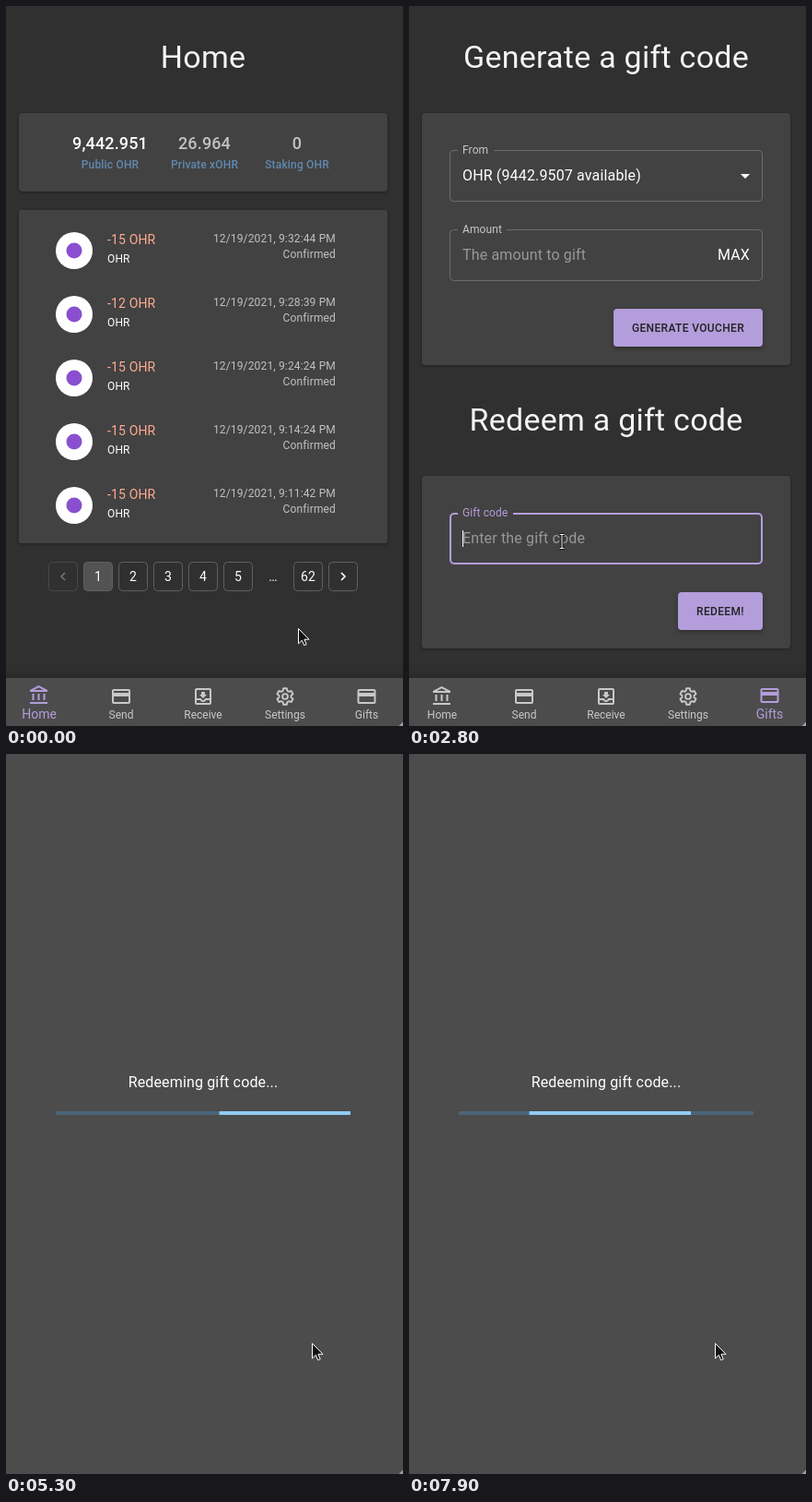
Write an HTML page that moves like this. It is 431 px wide and 780 px high and loops after 8 s.

```html
<!DOCTYPE html>
<html lang="en">
<head>
<meta charset="utf-8">
<title>Gift code wallet</title>
<style>
  html, body { margin: 0; width: 100%; height: 100%; overflow: hidden; background: #303030; }
  svg { display: block; width: 431px; height: 780px; }
  text { font: 400 16px Roboto, sans-serif; letter-spacing: .15px; fill: #fff; white-space: pre; }
  .title { font-size: 34px; letter-spacing: .25px; fill: #f4f4f4; }
  .total { font-size: 18px; font-weight: 500; letter-spacing: .135px; }
  .unit { font-size: 12px; font-weight: 500; letter-spacing: .17px; fill: #6189b0; }
  .sum { font-size: 14px; fill: #ffab91; }
  .small { font-size: 12px; }
  .dim { fill: #c2c2c2; }
  .label { font-size: 12px; letter-spacing: .11px; fill: #c6c6c6; }
  .page { font-size: 14px; }
  .hint { fill: #989898; }
  .btn { font-size: 12px; font-weight: 500; letter-spacing: .343px; fill: #212121; }
  .tab { letter-spacing: 0; }
  .card { fill: #424242; filter: drop-shadow(0 1px 1.5px rgba(0,0,0,.35)); }
  .box { fill: none; stroke: #6d6d6d; }
  .button { fill: #b39ddb; filter: drop-shadow(0 2px 2px rgba(0,0,0,.3)); }
  .bar { fill: #4c4c4c; filter: drop-shadow(0 1px 7px rgba(0,0,0,.35)); }
  .arrow { fill: #111; stroke: #fff; stroke-linejoin: round; }
  .hand { fill: #fff; stroke: #111; stroke-linejoin: round; }
</style>
</head>
<body>
<svg id="stage" viewBox="0 0 431 780" xmlns="http://www.w3.org/2000/svg"></svg>
<script>
const LOOP = 8000, STEP = 100;
const LILAC = [179, 157, 219], GREY = [200, 200, 200];
const COIN = "OHR";

// Markup helpers
const text = (x, y, str, cls = "", anchor = "start", more = "") =>
  `<text x="${x}" y="${y}" class="${cls}" text-anchor="${anchor}" ${more}>${str}</text>`;
const mid = (x, y, str, cls, more) => text(x, y, str, cls, "middle", more);
const rect = (x, y, w, h, cls, r = 4, more = "") =>
  `<rect x="${x}" y="${y}" width="${w}" height="${h}" rx="${r}" class="${cls}" ${more}/>`;

function gear() {
  const pts = [];
  for (let k = 0; k < 6; k++)
    for (const [r, off] of [[6.6, -21], [9, -12], [9, 12], [6.6, 21]]) {
      const a = (k * 60 - 90 + off) * Math.PI / 180;
      pts.push((12 + r * Math.cos(a)).toFixed(2) + " " + (12 + r * Math.sin(a)).toFixed(2));
    }
  return `<g fill="none" stroke="currentColor" stroke-width="1.9" stroke-linejoin="round">
    <path d="M${pts.join("L")}Z"/><circle cx="12" cy="12" r="2.9"/></g>`;
}

const outline = d => `<path fill="currentColor" fill-rule="evenodd" d="${d}"/>`;
const cardIcon = outline("M4 4H20a2 2 0 0 1 2 2V18a2 2 0 0 1-2 2H4a2 2 0 0 1-2-2V6a2 2 0 0 1 2-2ZM4 6V8H20V6ZM4 12V18H20V12Z");
const bankIcon = outline("M4.5 10h2v7h-2ZM10.5 10h2v7h-2ZM16.5 10h2v7h-2ZM2 19H21v2H2ZM11.5 1L21 6V8H2V6ZM11.5 3.26L6.29 6H16.71Z");
const inboxIcon = outline("M5 3H19a2 2 0 0 1 2 2V19a2 2 0 0 1-2 2H5a2 2 0 0 1-2-2V5a2 2 0 0 1 2-2ZM5 5V14H10a2 2 0 0 0 4 0H19V5ZM5 16V19H19V16H15.46a4 4 0 0 1-6.9 0ZM10 7H14V10H16L12 14 8 10H10Z");

const tabs = [["Home", 36, bankIcon], ["Send", 125, cardIcon], ["Receive", 214, inboxIcon],
  ["Settings", 303, gear()], ["Gifts", 391.5, cardIcon]];

function homePage() {
  let s = mid(214, 67, "Home", "title") + rect(14, 116, 400, 85, "card") + rect(14, 221, 400, 361, "card", 2);
  [["9,442.951", "Public ", 113], ["26.964", "Private x", 215.5], ["0", "Staking ", 316]].forEach(([n, name, x], i) => {
    s += mid(x, 155, n, i ? "total dim" : "total") + mid(x, 176, name + COIN, "unit");
  });
  [[15, "9:32:44"], [12, "9:28:39"], [15, "9:24:24"], [15, "9:14:24"], [15, "9:11:42"]].forEach(([n, time], i) => {
    const y = 265 + 69 * i;
    s += `<circle cx="74" cy="${y}" r="20" fill="#fff"/><circle cx="74" cy="${y}" r="8.5" fill="#8a4fd0"/>`
      + text(110, y - 7, `-${n} ${COIN}`, "sum") + text(110, y + 13, COIN, "small")
      + text(358, y - 9, `12/19/2021, ${time} PM`, "small dim", "end")
      + text(358, y + 8, "Confirmed", "small dim", "end");
  });
  [["", 46], [1, 84], [2, 122], [3, 160], [4, 198], [5, 236], [62, 312], ["", 350]].forEach(([n, x]) => {
    s += rect(x + .5, 602.5, 31, 31, "", 4,
      `fill="${n === 1 ? "#535353" : "none"}" stroke="#606060" opacity="${x === 46 ? .5 : 1}"`)
      + mid(x + 16, 623, n, "page");
  });
  return s + mid(290, 623, "…", "page")
    + `<g fill="none" stroke-width="1.7"><path d="M64 614L60 618 64 622" stroke="#747474"/>
       <path d="M364 614L368 618 364 622" stroke="#fff"/></g>`;
}

const field = (y, label, notch, id = "") =>
  rect(44.5, y + .5, 339, 55, "box", 4, id && `id="${id}Box"`)
  + `<rect x="53" y="${y - 1}" width="${notch}" height="4" fill="#424242"/>`
  + text(58, y + 4, label, "label", "start", id && `id="${id}Label"`);

const giftPage = () =>
  mid(214, 67, "Generate a gift code", "title") + rect(14, 116, 400, 273, "card")
  + field(156, "From", 39) + text(58, 189, COIN + " (9442.9507 available)")
  + `<path d="M360 182h10l-5 5z" fill="#fff"/>`
  + field(242, "Amount", 53) + text(58, 275, "The amount to gift", "hint") + text(370, 275, "MAX", "", "end")
  + rect(222, 328, 162, 41, "button") + mid(303, 353, "GENERATE VOUCHER", "btn")
  + mid(214, 460, "Redeem a gift code", "title") + rect(14, 509, 400, 187, "card")
  + field(549, "Gift code", 60, "code")
  + text(58, 582, "Enter the gift code", "hint", "start", `id="hint"`)
  + `<g clip-path="url(#inner)">${text(370, 582, "bieG9ociIsImFtdCI6MTM5OTIwMDAwMH0=", "", "end", 'id="pasted"')}</g>
     <rect id="caret" y="568" width="1" height="18" fill="#fff"/>`
  + rect(292, 635, 92, 41, "button", 4, `id="redeem"`) + mid(338, 660, "REDEEM!", "btn");

const tabBar = () => rect(-10, 728, 451, 62, "bar", 0)
  + `<g clip-path="url(#tabArea)"><circle id="ripple" cx="378" cy="754" fill="#b39ddb"/></g>`
  + tabs.map(([name, x, icon], i) =>
    `<g id="tab${i}" style="color:rgb(${GREY})"><g class="icon" transform="translate(${x - 12} 736)">${icon}</g>
     ${mid(x, 772, name, "tab", 'style="font-size:12px;fill:currentColor"')}</g>`).join("");

const loadPage = () => `<rect width="431" height="780" fill="#4c4c4c"/>`
  + mid(214, 361, "Redeeming gift code...")
  + `<rect x="54" y="387" width="320" height="4" fill="#4a6478"/>
     <g fill="#90caf9"><rect id="bar1" y="387" height="4"/><rect id="bar2" y="387" height="4"/></g>`;

const cursors = `<g id="cursor">
  <path class="arrow" d="M.5 .5V16.8L4.3 13.2 6.7 18.6 9.2 17.5 6.9 12.2H12Z"/>
  <path class="hand" d="M.5 10V2a1.7 1.7 0 0 1 3.4 0V6.2q1.6-1 2.7.4 1.6-.8 2.6.6 2.3-.6 2.3 1.7V12q0 2-1.2 3.6V18H2.2V16L-2.6 10.6q-.9-1.6.5-2.2 1.2-.3 2.6 1.6Z"/>
  <g fill="none"><path stroke="#111" stroke-width="3" d="M-3-7.5H3M0-7.5V7.5M-3 7.5H3"/>
  <path stroke="#fff" d="M-2.5-7.5H2.5M0-7.5V7.5M-2.5 7.5H2.5"/></g></g>`;

const $ = id => document.getElementById(id);
$("stage").innerHTML = `<defs>
  <clipPath id="inner"><rect x="58" y="560" width="312" height="30"/></clipPath>
  <clipPath id="tabArea"><rect x="347" y="728" width="89" height="52"/></clipPath></defs>
  <rect width="431" height="780" fill="#303030"/>
  <g id="home">${homePage()}</g><g id="gift">${giftPage()}</g><g id="tabs">${tabBar()}</g>
  <g id="load">${loadPage()}</g><path d="M431 775.5L426.5 780H431Z" fill="#a0a0a0"/>${cursors}`;

// Timing helpers
const clamp = v => Math.min(1, Math.max(0, v));
const span = (t, a, b) => clamp((t - a) / (b - a));
const lerp = (a, b, k) => a + (b - a) * k;
const mix = (a, b, k) => `rgb(${a.map((v, i) => Math.round(lerp(v, b[i], k)))})`;
const smooth = k => k * k * (3 - 2 * k);
const show = (el, on) => { el.style.display = on ? "" : "none"; };

function bezier(x1, y1, x2, y2) {
  const at = (a, b, s) => 3 * (1 - s) * (1 - s) * s * a + 3 * (1 - s) * s * s * b + s * s * s;
  return x => {
    let lo = 0, hi = 1;
    for (let i = 0; i < 24; i++) {
      const m = (lo + hi) / 2;
      if (at(x1, x2, m) < x) lo = m; else hi = m;
    }
    return at(y1, y2, (lo + hi) / 2);
  };
}
const sweep = bezier(.65, .815, .735, .395), dash = bezier(.165, .84, .44, 1);

// Start time, end time, from, to
const moves = [
  [200, 900, [317, 674], [376, 752]],
  [1500, 2200, [376, 752], [166, 580]],
  [3300, 4000, [166, 580], [327, 661]],
  [4400, 5300, [327, 661], [332, 638]]
];

function moveCursor(t) {
  const [a, b, from, to] = moves.filter(m => t >= m[0]).pop() || moves[0];
  const k = smooth(span(t, a, b));
  const x = lerp(from[0], to[0], k), y = lerp(from[1], to[1], k);
  let kind = 0;
  if (t < 4300) {
    if (y > 728 || (t > 1500 && x > 292 && y > 635 && y < 676)) kind = 1;
    else if (t > 1500 && y > 549 && y < 605) kind = 2;
  }
  $("cursor").setAttribute("transform", `translate(${Math.round(x)} ${Math.round(y)})`);
  [...$("cursor").children].forEach((c, i) => show(c, i === kind));
}

function setTab(i, k) {
  const tab = $("tab" + i);
  tab.style.color = mix(GREY, LILAC, k);
  tab.querySelector("text").style.fontSize = 12 + 2 * k + "px";
  tab.querySelector(".icon").setAttribute("transform", `translate(${tabs[i][1] - 12} ${736 - k})`);
}

function setBar(id, left, right) {
  const a = clamp(left), b = clamp(right);
  $(id).setAttribute("x", 54 + 320 * a);
  $(id).setAttribute("width", 320 * Math.max(0, b - a));
}

function drawProgress(t) {
  const time = Math.max(t, 4396) - 4306;
  const e1 = sweep(clamp(time % 2100 / 1260));
  const e2 = time < 1150 ? 0 : dash(clamp((time - 1150) % 2100 / 1260));
  setBar("bar1", -.35 + 1.35 * e1, 1.9 * e1);
  setBar("bar2", -2 + 3.07 * e2, 1.08 * e2);
}

function drawField(t) {
  const focus = t >= 2300 && t < 4100, pasted = t >= 3100;
  const box = $("codeBox");
  box.style.stroke = focus ? "#b39ddb" : "";
  box.style.strokeWidth = focus ? 2 : 1;
  const inset = focus ? 1 : .5;
  box.setAttribute("x", 44 + inset);
  box.setAttribute("y", 549 + inset);
  box.setAttribute("width", 340 - 2 * inset);
  box.setAttribute("height", 56 - 2 * inset);
  $("codeLabel").style.fill = mix([198, 198, 198], LILAC, focus ? span(t, 2200, 2400) : 0);
  show($("hint"), !pasted);
  show($("pasted"), pasted);
  show($("caret"), focus);
  $("caret").setAttribute("x", pasted ? 370 : 58);
  $("redeem").style.fill = mix(LILAC, [125, 109, 153], span(t, 3700, 3950));
}

function draw(t) {
  const loading = t >= 4300;
  show($("home"), t < 1500);
  show($("gift"), t >= 1500 && !loading);
  show($("tabs"), !loading);
  show($("load"), loading);
  const k = span(t, 1480, 1680);
  setTab(0, 1 - k);
  setTab(4, k);
  $("ripple").setAttribute("r", t < 1400 ? 0 : lerp(24, 66, span(t, 1400, 1560)));
  $("ripple").style.opacity = .22 * (1 - span(t, 1500, 1750));
  drawField(t);
  drawProgress(t);
  moveCursor(t);
}

let start;
function tick(now) {
  start ??= now;
  draw(Math.floor((now - start) % LOOP / STEP) * STEP);
  requestAnimationFrame(tick);
}
draw(0);
requestAnimationFrame(tick);
</script>
</body>
</html>
```
